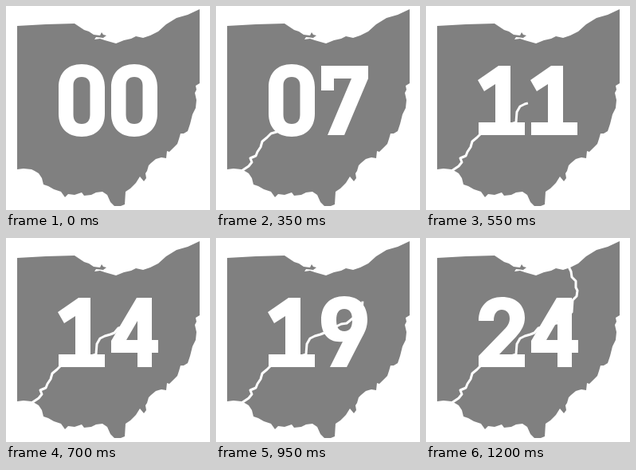
Animation of 256 by 256 pixels, one loop 1.25 s. Source, as an HTML page:

```html
<!DOCTYPE html>
<html lang="en">
<head>
<meta charset="utf-8">
<title>State counter</title>
<style>
html, body { margin: 0; width: 100%; height: 100%; overflow: hidden; background: #fff; }
svg { display: block; width: 100vw; height: 100vh; }
.land { fill: #808080; }
.road { fill: none; stroke: #fff; stroke-width: 3; stroke-linejoin: round; }
.digit { fill: #fff; fill-rule: evenodd; }
</style>
</head>
<body>
<svg viewBox="0 0 256 256" role="img" aria-label="Counter from 00 to 24">
  <path class="land" d="M14 25L50 23 86 22 92 26 98 30 104 32 110 36 118 37 120 33 122 36 126 37 122 40 113 39
    111 42 118 41 124 43 131 45 138 47 148 43 157 41 163 38 172 40 181 37 191 32 201 23 214 15 228 11 243 4
    V97L238 100 239 105 237 109 239 118 238 128 234 136 231 148 228 157 223 160 219 160 217 167 215 173
    209 179 205 183 202 182 201 191 195 190 188 192 182 197 179 200 177 207 175 210 176 216 173 220 168 214
    163 222 156 229 150 233 149 249 144 251 136 251 131 246 127 237 121 233 113 234 107 237 98 238 95 234
    86 237 78 236 74 240 69 233 60 230 53 226 47 224 45 216 41 210 36 207 32 205 22 204 14 205Z"/>
  <path class="road" d="M32 207L41 201 45 196 43 191 50 188 52 183 56 177 58 170 64 165 69 160 76 158 113 146
    114 133 118 126 124 123 131 121 136 119 141 113 151 111 157 108 164 107 175 98 183 93 184 78 189 73 190 66
    188 62 188 54 183 49 182 42 179 36"/>
  <path class="digit" transform="translate(65 73)"/>
  <path class="digit" transform="translate(131 73)"/>
</svg>
<script>
const STEP = 50, COUNT = 25;
const six = 'M27 2H48L32 34C49 32 59 43 59 61C59 80 48 91 30 91S1 80 1 62C1 52 4 46 9 37Z' +
  'M30 47C23 47 20 52 20 61S23 75 30 75 40 70 40 61 37 47 30 47Z';

// Half-turn of an absolute outline inside the 60 x 91 digit box
const turn = d => d.replace(/([MLCSHV])([^MLCSHVZ]*)/g, (_, cmd, args) =>
  cmd + args.trim().split(/\s+/).map((v, i) =>
    (cmd === 'V' || (cmd !== 'H' && i % 2) ? 91 : 60) - v).join(' '));

const glyphs = [
  'M30 0C48 0 59 11 59 29V62C59 80 48 91 30 91S1 80 1 62V29C1 11 12 0 30 0Z' +
    'M30 16C23 16 19.5 20 19.5 27V63C19.5 71 23 75 30 75S40.5 71 40.5 63V27C40.5 20 37 16 30 16Z',
  'M26 2H41V73H59V89H1V73H22V25L8 34L0 20Z',
  'M1 31C1 12 13 1 30 1C48 1 59 11 59 27C59 36 55 43 48 51L27 73H59V89H1V75L33 42' +
    'C38 37 40 33 40 28C40 21 36 17 30 17S20 22 20 31Z',
  'M5 2H56V17L37 37C51 39 59 48 59 62C59 80 47 91 29 91C12 91 2 81 1 65H20C20 71 23 75 30 75' +
    'C36 75 40 71 40 63C40 55 36 51 28 51H21V37L34 18H5Z',
  'M33 2H52V55H60V71H52V89H34V71H1V56ZM34 31V55H20Z',
  'M6 2H56V18H23V35C26 32 31 31 36 31C51 31 59 42 59 60C59 80 48 91 30 91C13 91 2 82 1 66H20' +
    'C21 72 24 75 30 75C37 75 40 71 40 61C40 51 37 47 30 47C25 47 23 49 22 52H6Z',
  six,
  'M1 2H60V18L30 89H9L39 18H17V33H1Z',
  'M30 0C47 0 57 10 57 25C57 34 53 40 47 44C55 48 59 55 59 64C59 81 48 91 30 91S1 81 1 64' +
    'C1 55 5 48 13 44C7 40 3 34 3 25C3 10 13 0 30 0Z' +
    'M30 16C24 16 21 20 21 26S24 37 30 37 39 32 39 26 36 16 30 16Z' +
    'M30 52C23 52 20 57 20 63S23 75 30 75 40 70 40 63 37 52 30 52Z',
  turn(six)
];

// Count and road length reached at that count
const reach = [[0, 0], [11, 143], [21, 240], [24, 275]];

function roadLength(n) {
  const i = Math.max(1, reach.findIndex(([at]) => at >= n));
  const [a, from] = reach[i - 1], [b, to] = reach[i];
  return from + (to - from) * (n - a) / (b - a);
}

const road = document.querySelector('.road');
const [tens, units] = document.querySelectorAll('.digit');
let shown = -1;

function show(n) {
  if (n === shown) return;
  shown = n;
  tens.setAttribute('d', glyphs[Math.floor(n / 10)]);
  units.setAttribute('d', glyphs[n % 10]);
  road.style.visibility = n ? 'visible' : 'hidden';
  road.setAttribute('stroke-dasharray', roadLength(n) + ' 999');
}

const start = performance.now();
function tick() {
  show(Math.floor((performance.now() - start) / STEP) % COUNT);
  requestAnimationFrame(tick);
}
tick();
</script>
</body>
</html>
```
